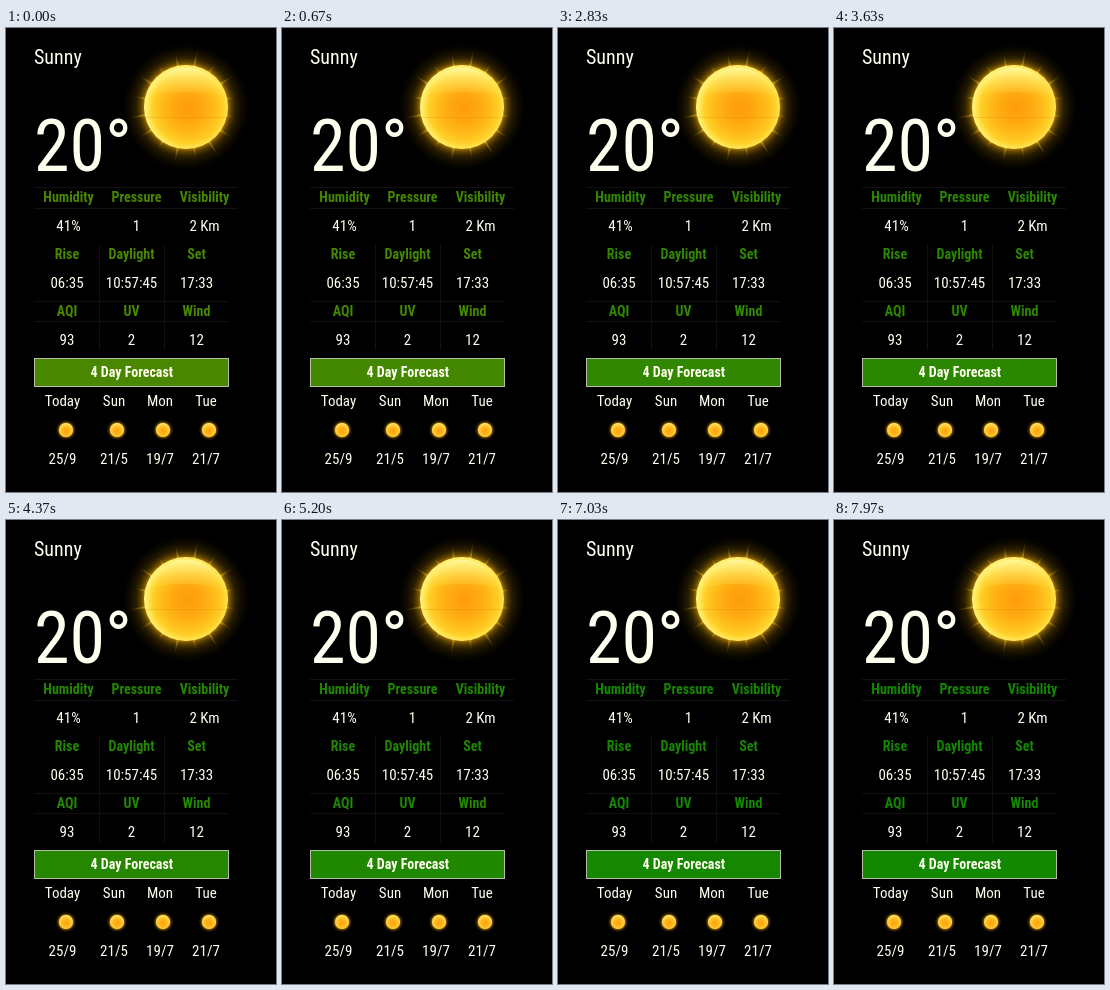
Animation of 270 by 464 pixels, one loop 8 s. Source, as an HTML page with a canvas:

```html
<!DOCTYPE html>
<html lang="en">
<head>
<meta charset="utf-8">
<title>Weather widget</title>
<style>
  html, body { margin: 0; width: 100%; height: 100%; overflow: hidden; background: #000; }
  canvas { display: block; width: 270px; height: 464px; }
</style>
</head>
<body>
<canvas id="stage"></canvas>
<script>
const W = 270, H = 464, LOOP = 8000, STEP = 100 / 3;
const CREAM = '#fffff0';
const canvas = document.getElementById('stage');
const ctx = canvas.getContext('2d');
const ratio = window.devicePixelRatio || 1;
canvas.width = W * ratio;
canvas.height = H * ratio;

const condensed = (size, weight) =>
  `condensed ${weight} ${size}px "Roboto Condensed", Roboto, sans-serif`;

// Use the condensed face when present, otherwise narrow the regular one.
function narrowing() {
  const sample = 'Humidity 0123';
  ctx.font = '400 100px Roboto, sans-serif';
  const regular = ctx.measureText(sample).width;
  ctx.font = condensed(100, 400);
  return ctx.measureText(sample).width < regular * 0.95 ? 1 : 0.88;
}
const narrow = narrowing();

function text(str, x, y, size, color = CREAM, weight = 400, align = 'center') {
  ctx.save();
  ctx.translate(x, y);
  ctx.scale(narrow, 1);
  ctx.font = condensed(size, weight);
  ctx.textAlign = align;
  ctx.fillStyle = color;
  ctx.fillText(str, 0, 0);
  ctx.restore();
}

function radial(x, y, r, stops) {
  const g = ctx.createRadialGradient(x, y, 0, x, y, r);
  stops.forEach(([at, color]) => g.addColorStop(at, color));
  return g;
}

function disc(x, y, r, fill) {
  ctx.fillStyle = fill;
  ctx.beginPath();
  ctx.arc(x, y, r, 0, Math.PI * 2);
  ctx.fill();
}

function ray(angle, length) {
  ctx.save();
  ctx.rotate(angle);
  const g = ctx.createLinearGradient(40, 0, length, 0);
  g.addColorStop(0, 'rgba(255,205,40,.55)');
  g.addColorStop(1, 'rgba(150,100,0,0)');
  ctx.fillStyle = g;
  ctx.beginPath();
  ctx.moveTo(40, -1.3);
  ctx.lineTo(length, 0);
  ctx.lineTo(40, 1.3);
  ctx.fill();
  ctx.restore();
}

function bigSun() {
  ctx.save();
  ctx.translate(180, 79);
  disc(0, 0, 64, radial(0, 0, 64, [
    [0, '#b88300'], [0.64, '#b88300'], [0.7, 'rgba(130,92,0,.75)'],
    [0.78, 'rgba(75,54,0,.55)'], [0.88, 'rgba(45,32,0,.35)'], [1, 'rgba(20,14,0,0)']
  ]));
  for (let i = 0; i < 16; i++) ray(0.2 + i * Math.PI / 8, 51 + (i * 7 % 5) * 2.5);
  disc(0, 0, 42, radial(2, 1, 43, [
    [0, '#ff9c0c'], [0.3, '#ffa60f'], [0.6, '#ffba18'],
    [0.82, '#ffcf28'], [0.92, '#ffe450'], [1, '#fff27c']
  ]));

  const gloss = ctx.createLinearGradient(0, -40, 0, -12);
  gloss.addColorStop(0, 'rgba(255,252,170,.85)');
  gloss.addColorStop(1, 'rgba(255,228,85,.12)');
  ctx.fillStyle = gloss;
  ctx.beginPath();
  ctx.arc(0, 0, 39.5, Math.PI * 1.09, Math.PI * 1.91);
  ctx.quadraticCurveTo(0, -19, -38, -11);
  ctx.fill();

  ctx.fillStyle = 'rgba(205,125,0,.25)';
  ctx.fillRect(-40, 10, 80, 1);
  ctx.restore();
}

function smallSun(x) {
  disc(x, 402, 11, radial(x, 402, 11, [
    [0, '#a97800'], [0.62, '#a97800'], [0.78, 'rgba(75,52,0,.6)'], [1, 'rgba(25,16,0,0)']
  ]));
  disc(x, 402, 7, radial(x, 403, 7.8, [
    [0, '#ff9f10'], [0.45, '#ffb41a'], [0.8, '#ffd240'], [1, '#fff080']
  ]));
}

function grid() {
  ctx.fillStyle = '#111';
  [159, 180, 273, 293].forEach(y => ctx.fillRect(28, y, y < 200 ? 204 : 195, 1));
  [93, 158].forEach(x => ctx.fillRect(x, 216, 1, 106));
}

// The accent hue drifts from olive green towards pure green.
function accent(t, light) {
  const p = Math.floor(t / STEP + 0.01) * STEP / LOOP;
  const hue = 87 + 25 * (1 - (1 - p) ** 1.35);
  return `hsl(${hue}, 100%, ${light}%)`;
}

const rows = [
  [174, ['Humidity', 'Pressure', 'Visibility'], ['41%', '1', '2 Km'], [62.5, 130.5, 198.5]],
  [231, ['Rise', 'Daylight', 'Set'], ['06:35', '10:57:45', '17:33'], [61, 125.5, 190.5]],
  [288, ['AQI', 'UV', 'Wind'], ['93', '2', '12'], [61, 125.5, 190.5]]
];
const days = [
  ['Today', '25/9', 56.5, 60], ['Sun', '21/5', 108, 111],
  ['Mon', '19/7', 154, 157], ['Tue', '21/7', 200, 203]
];

function draw(t) {
  ctx.setTransform(ratio, 0, 0, ratio, 0, 0);
  ctx.fillStyle = '#000';
  ctx.fillRect(0, 0, W, H);
  bigSun();
  text('Sunny', 28, 36, 20, CREAM, 400, 'left');
  text('20°', 28, 143, 72, CREAM, 400, 'left');
  grid();

  const green = accent(t, 26.5);
  rows.forEach(([y, labels, values, xs]) => xs.forEach((x, i) => {
    text(labels[i], x, y, 14, green, 700);
    text(values[i], x, y + 29, 15);
  }));

  ctx.fillStyle = green;
  ctx.fillRect(28, 330, 195, 29);
  ctx.strokeStyle = '#b4bea8';
  ctx.lineWidth = 1;
  ctx.strokeRect(28.5, 330.5, 194, 28);
  text('4 Day Forecast', 125.8, 349, 14, CREAM, 700);

  days.forEach(([day, temps, x, sunX]) => {
    text(day, x, 378, 15);
    smallSun(sunX);
    text(temps, x, 436, 15);
  });
}

const start = performance.now();
function tick() {
  draw((performance.now() - start) % LOOP);
  requestAnimationFrame(tick);
}
tick();
</script>
</body>
</html>
```
